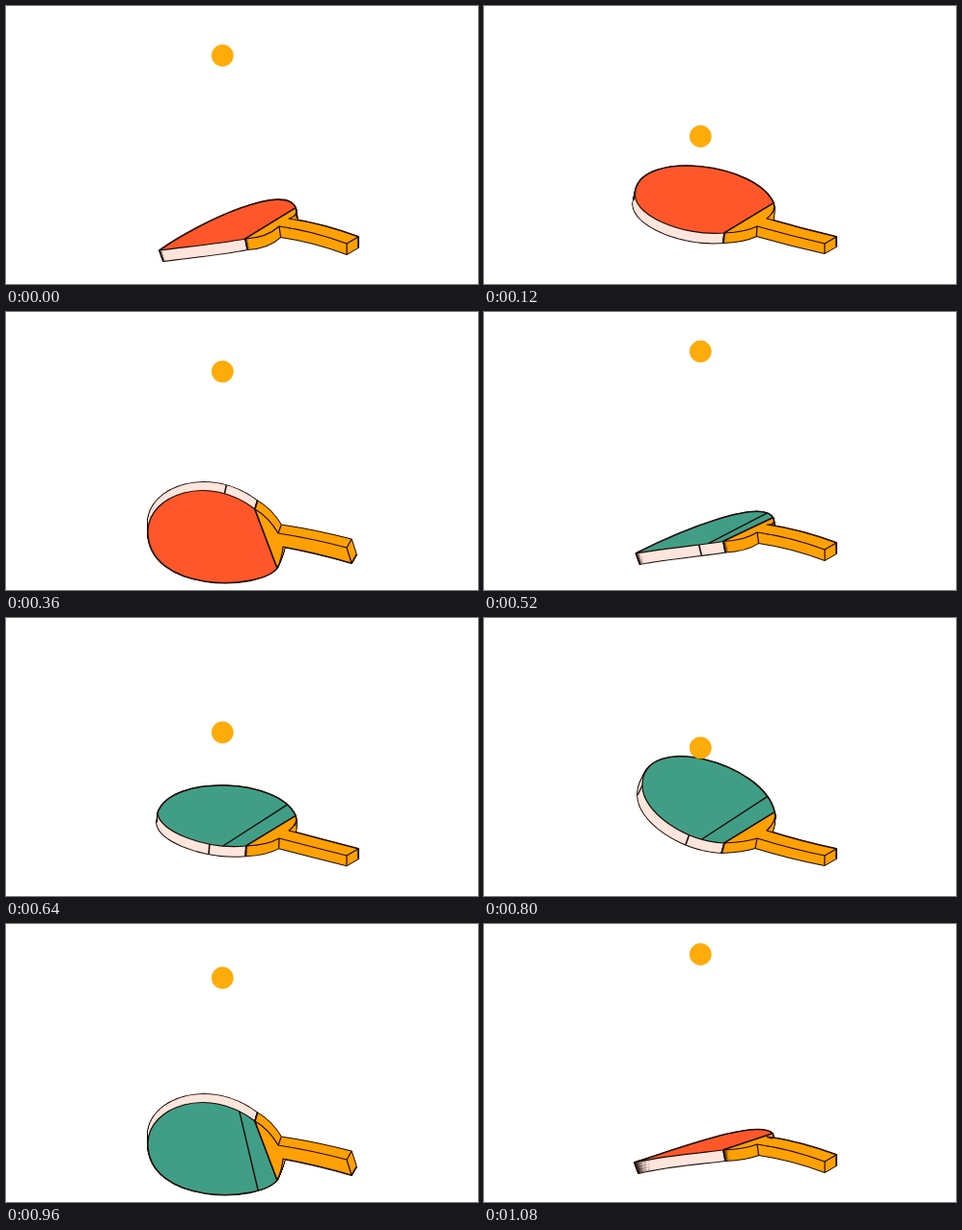
An HTML page with a canvas that plays this animation: 489x289 px, repeating every 1120 ms.

```html
<!DOCTYPE html>
<html lang="en">
<head>
<meta charset="utf-8">
<title>Paddle and ball</title>
<style>
html, body { margin: 0; width: 100%; height: 100%; overflow: hidden; background: #fff; }
canvas { display: block; }
</style>
</head>
<body>
<canvas id="stage" width="489" height="289"></canvas>
<script>
const ctx = document.getElementById('stage').getContext('2d');
const LOOP = 1120, STEP = 40;
const RED = '#ff5729', GREEN = '#409e87', WOOD = '#ffa005', RIM = '#ffe5dc', INK = '#1c0a04', BALL = '#ffab0a';

// Handle corners, then the offsets of the two neck curves, then the depth shift at the end
const level = { pts: [293, 221, 365, 240, 353, 247, 283, 229], neckB: [3, 8], neckA: [22, -1], dx: 0 };
const turned = { pts: [282, 230, 353, 245, 358, 261, 287, 244], neckB: [14, 8], neckA: [5, -10], dx: 5 };

// The blade is two Bezier curves: near joint, tip, far joint. (dx, dy) is its depth.
function pose(blade, handle, dx, dy, bend) {
  const pairs = list => list.flatMap((v, i) => i % 2 ? [] : [[v, list[i + 1]]]);
  const b = pairs(blade), [nb, eb, ea, na] = pairs(handle.pts);
  const add = (p, d) => [p[0] + d[0], p[1] + d[1]];
  const mid = (p, q) => [(p[0] + q[0]) / 2, (p[1] + q[1]) / 2 + bend];
  return [...b, add(b[6], handle.neckB), nb, mid(nb, eb), eb, ea, mid(ea, na), na, add(b[0], handle.neckA)]
    .map(([x, y]) => {
      const k = Math.min(1, Math.max(0, (x - 155) / 205));
      return { x, y, dx: dx + (handle.dx - dx) * k, dy };
    });
}

const edge = pose([248, 235, 222, 238, 185, 241, 156, 248, 200, 234, 285, 202, 299, 218], level, 4, 11, -4);
const low = pose([248, 242, 222, 247, 190, 250, 159, 254, 205, 222, 290, 184, 300, 210], level, 4, 11, -4);
const flat = pose([249, 236, 205, 240, 150, 216, 157, 192, 164, 150, 282, 163, 300, 205], level, -2, 10, 1);
const raised = pose([249, 234, 208, 232, 164, 202, 164, 174, 164, 117, 290, 150, 301, 202], level, -5, 10, 2);
const front = pose([271, 264, 250, 300, 142, 298, 147, 208, 147, 160, 225, 152, 280, 198], turned, 0, -3, 0);
const over = pose([281, 266, 262, 290, 147, 292, 147, 228, 147, 190, 210, 167, 258, 205], turned, 0, -8.5, -2);

const keys = [
  [-40, edge], [0, low], [120, flat], [232, raised], [305, front], [360, over],
  [500, edge], [540, low], [660, flat], [800, raised], [885, front], [960, over], [1080, edge]
];

// The same solid described from its other face
const flip = p => p.map((_, i) => {
  const q = p[(21 - i) % 15];
  return { x: q.x + q.dx, y: q.y + q.dy, dx: -q.dx, dy: -q.dy };
});

const mix = (p, q, k) => p.map((a, i) => {
  const b = q[i], m = n => a[n] + (b[n] - a[n]) * k;
  return { x: m('x'), y: m('y'), dx: m('dx'), dy: m('dy') };
});

function paddleAt(t) {
  let i = 0;
  while (i < keys.length - 2 && t >= keys[i + 1][0]) i++;
  const [t0, p0] = keys[i], [t1, p1] = keys[i + 1];
  const turning = p0 === over;
  let pts = mix(turning ? flip(p0) : p0, p1, (t - t0) / (t1 - t0));
  let green = (i >= 6) !== turning;
  const area = pts.slice(0, 7).reduce((s, p, j, a) => {
    const q = a[(j + 1) % 7];
    return s + p.x * q.y - q.x * p.y;
  }, 0);
  if (area < 0) {
    pts = flip(pts);
    green = !green;
  }
  return { pts, green };
}

function ballAt(t) {
  const top = 31.5, hit = 190;
  const fall = ms => top + 18 * ms / 40 + 2 * (ms / 40) ** 2;
  const rise = (k, power) => top + (hit - top) * (1 - k) ** power;
  if (t < 180) return fall(t + 40);
  if (t < 500) return rise((t - 180) / 320, 2);
  if (t < 720) return fall(t - 500);
  return rise((t - 720) / 360, 1.7);
}

const shift = (p, k) => p.map(q => [q.x + q.dx * k, q.y + q.dy * k]);

function rubberPath(p) {
  const [a, c1, c2, tip, c3, c4, b] = p;
  ctx.beginPath();
  ctx.moveTo(...a);
  ctx.bezierCurveTo(...c1, ...c2, ...tip);
  ctx.bezierCurveTo(...c3, ...c4, ...b);
  ctx.closePath();
}

function woodPath(p) {
  const [kb, nb, hb, eb, ea, ha, na, ka] = p.slice(7);
  ctx.beginPath();
  ctx.moveTo(...p[6]);
  ctx.quadraticCurveTo(...kb, ...nb);
  ctx.quadraticCurveTo(...hb, ...eb);
  ctx.lineTo(...ea);
  ctx.quadraticCurveTo(...ha, ...na);
  ctx.quadraticCurveTo(...ka, ...p[0]);
  ctx.closePath();
}

function line(p, q, width = 1.2) {
  ctx.lineWidth = width;
  ctx.beginPath();
  ctx.moveTo(...p);
  ctx.lineTo(...q);
  ctx.stroke();
}

// Extrude an outline along its depth, then put the face on top
function solid(pts, path, side, face, corners) {
  const n = 12;
  ctx.lineWidth = 2;
  for (let i = 0; i <= n; i++) { path(shift(pts, i / n)); ctx.stroke(); }
  ctx.fillStyle = side;
  for (let i = 0; i <= n; i++) { path(shift(pts, i / n)); ctx.fill(); }
  const near = shift(pts, 0), far = shift(pts, 1);
  corners.forEach(i => line(near[i], far[i]));
  path(near);
  ctx.fillStyle = face;
  ctx.fill();
  ctx.lineWidth = 1.2;
  ctx.stroke();
}

function onCurve(p, i, t) {
  const u = 1 - t, w = [u * u * u, 3 * u * u * t, 3 * u * t * t, t * t * t];
  return [0, 1].map(d => w.reduce((s, v, j) => s + v * p[i + j][d], 0));
}

function draw() {
  let t = Math.floor(performance.now() % LOOP / STEP) * STEP;
  if (t >= 1080) t -= LOOP;
  const { pts, green } = paddleAt(t);
  const near = shift(pts, 0), far = shift(pts, 1);

  ctx.fillStyle = '#fff';
  ctx.fillRect(0, 0, 489, 289);
  ctx.strokeStyle = INK;
  ctx.lineJoin = 'round';

  solid(pts, rubberPath, RIM, green ? GREEN : RED, [0, 3, 6]);
  if (green) line(onCurve(near, 0, 0.19), onCurve(near, 3, 0.89), 1.4);
  // The seam in the rim belongs to the green side
  const down = pts[0].dy > 0;
  if (green === down) {
    const [i, k] = down ? [0, 0.3] : [3, 0.79];
    line(onCurve(near, i, k), onCurve(far, i, k), 1.6);
  }
  solid(pts, woodPath, WOOD, WOOD, [0, 6, 8, 10, 11, 13]);

  ctx.fillStyle = BALL;
  ctx.beginPath();
  ctx.arc(224.3, ballAt(t), 11.4, 0, Math.PI * 2);
  ctx.fill();
  requestAnimationFrame(draw);
}
draw();
</script>
</body>
</html>
```
